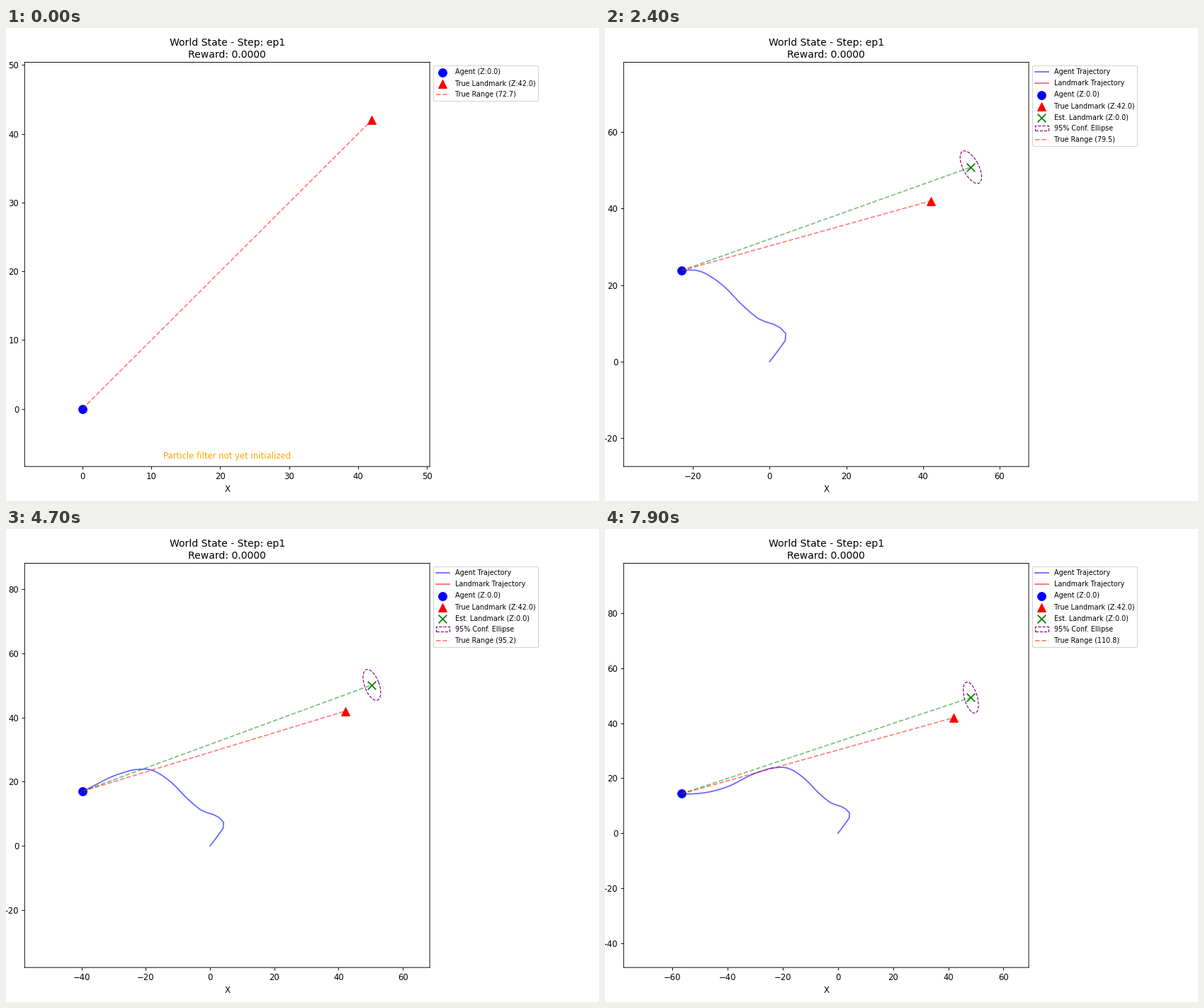
A matplotlib script for the animation above (8 s loop, 837 px wide and 669 px high).

```python
import numpy as np
import matplotlib.pyplot as plt
from matplotlib.animation import FuncAnimation
from matplotlib.patches import Ellipse

W, H, DPI = 837, 669, 83.7
FRAMES, INTERVAL = 80, 100
LANDMARK = np.array([42.0, 42.0, 42.0])

plt.rcParams["font.family"] = "DejaVu Sans"
steps = np.arange(FRAMES)


def smooth(keys):
    """Cubic Hermite curve through (step, x, y) keys, one point per step."""
    k, p = np.split(np.array(keys, float), [1], axis=1)
    k = k[:, 0]
    m = np.gradient(p, k, axis=0, edge_order=2)
    i = np.clip(np.searchsorted(k, steps, side="right") - 1, 0, len(k) - 2)
    h = (k[i + 1] - k[i])[:, None]
    u = (steps - k[i])[:, None] / h
    return ((1 + 2 * u) * (1 - u) ** 2 * p[i] + u * (1 - u) ** 2 * h * m[i]
            + u * u * (3 - 2 * u) * p[i + 1] - u * u * (1 - u) * h * m[i + 1])


# A sharp turn at the start, then an ever slower glide to the left.
path = smooth([(0, 0, 0), (2, 2.75, 3.65), (3, 4.05, 5.5), (4, 4.2, 7.35),
               (5, 2.75, 8.85), (8, -2.9, 11.2), (10, -6.42, 14.1),
               (14, -11.9, 19.65), (18, -16.96, 23.15), (24, -23, 23.8),
               (30, -28.17, 22.45), (47, -39.72, 17.05),
               (59, -46.06, 15.15), (79, -56.75, 14.35)])
est = smooth([(0, 49.3, 42), (10, 52.6, 46.05), (18, 53.1, 49.65),
              (30, 51.6, 51.2), (47, 50.35, 50.2), (79, 48.2, 49.3)])

# The confidence region collapses quickly, then grows slowly in y.
spread = np.exp(-steps ** 2 / 106)
ext_x = 2.75 + 13.4 * spread
ext_y = 3.6 + 0.026 * steps + 7.8 * spread
corr = np.interp(steps, [0, 10, 18, 30, 79], [0, -0.2, -0.69, -0.52, -0.48])

fig = plt.figure(figsize=(W / DPI, 7.993), dpi=DPI)
LEFT, RIGHT, TOP, BOTTOM = 26.3, 598.1, 48.5, 620.2
ax = fig.add_axes([LEFT / W, 1 - BOTTOM / H,
                   (RIGHT - LEFT) / W, (BOTTOM - TOP) / H])
for spine in ax.spines.values():
    spine.set_snap(False)


def conf_ellipse(n):
    sx, sy = ext_x[n], ext_y[n]
    cxy = corr[n] * sx * sy
    vals, vecs = np.linalg.eigh([[sx * sx, cxy], [cxy, sy * sy]])
    major = vecs[:, 1]
    return Ellipse(est[n], 2 * np.sqrt(vals[1]), 2 * np.sqrt(vals[0]),
                   angle=np.degrees(np.arctan2(major[1], major[0])),
                   edgecolor="purple", facecolor="none", linestyle="--",
                   label="95% Conf. Ellipse")


def link(a, b, color, label=None):
    ax.plot([a[0], b[0]], [a[1], b[1]], "--", color=color, alpha=0.5,
            label=label)


def fit_view(points):
    lo, hi = points.min(axis=0), points.max(axis=0)
    mid, half = (lo + hi) / 2, 0.7 * (hi - lo).max()
    ax.set_xlim(mid[0] - half, mid[0] + half)
    ax.set_ylim(mid[1] - half, mid[1] + half)


def draw(n):
    ax.clear()
    agent, mark = path[n], LANDMARK[:2]
    seen = np.vstack([path[:n + 1], mark])
    ready = n > 0

    if ready:
        ax.plot(*path[:n + 1].T, "b-", alpha=0.6, label="Agent Trajectory")
        ax.plot([mark[0]] * 2, [mark[1]] * 2, "r-", alpha=0.6,
                label="Landmark Trajectory")
    ax.scatter(*agent, c="blue", s=100, label="Agent (Z:0.0)")
    ax.scatter(*mark, c="red", s=100, marker="^",
               label=f"True Landmark (Z:{LANDMARK[2]:.1f})")
    if ready:
        ax.scatter(*est[n], c="green", s=100, marker="x",
                   label="Est. Landmark (Z:0.0)")
        ax.add_patch(conf_ellipse(n))
        link(agent, est[n], "green")
        seen = np.vstack([seen, est[n]])
    else:
        ax.text(0.5, 0.02, "Particle filter not yet initialized",
                color="orange", ha="center", transform=ax.transAxes)

    dist = np.linalg.norm(LANDMARK - [*agent, 0])
    link(agent, mark, "red", f"True Range ({dist:.1f})")

    fit_view(seen)
    ax.set_xlabel("X")
    ax.set_title("World State - Step: ep1\nReward: 0.0000")
    ax.legend(loc="upper left", bbox_to_anchor=(1, 1), fontsize="small",
              labelspacing=0.62)
    return []


anim = FuncAnimation(fig, draw, frames=FRAMES, interval=INTERVAL,
                     repeat=True, repeat_delay=0)
plt.show()
```
